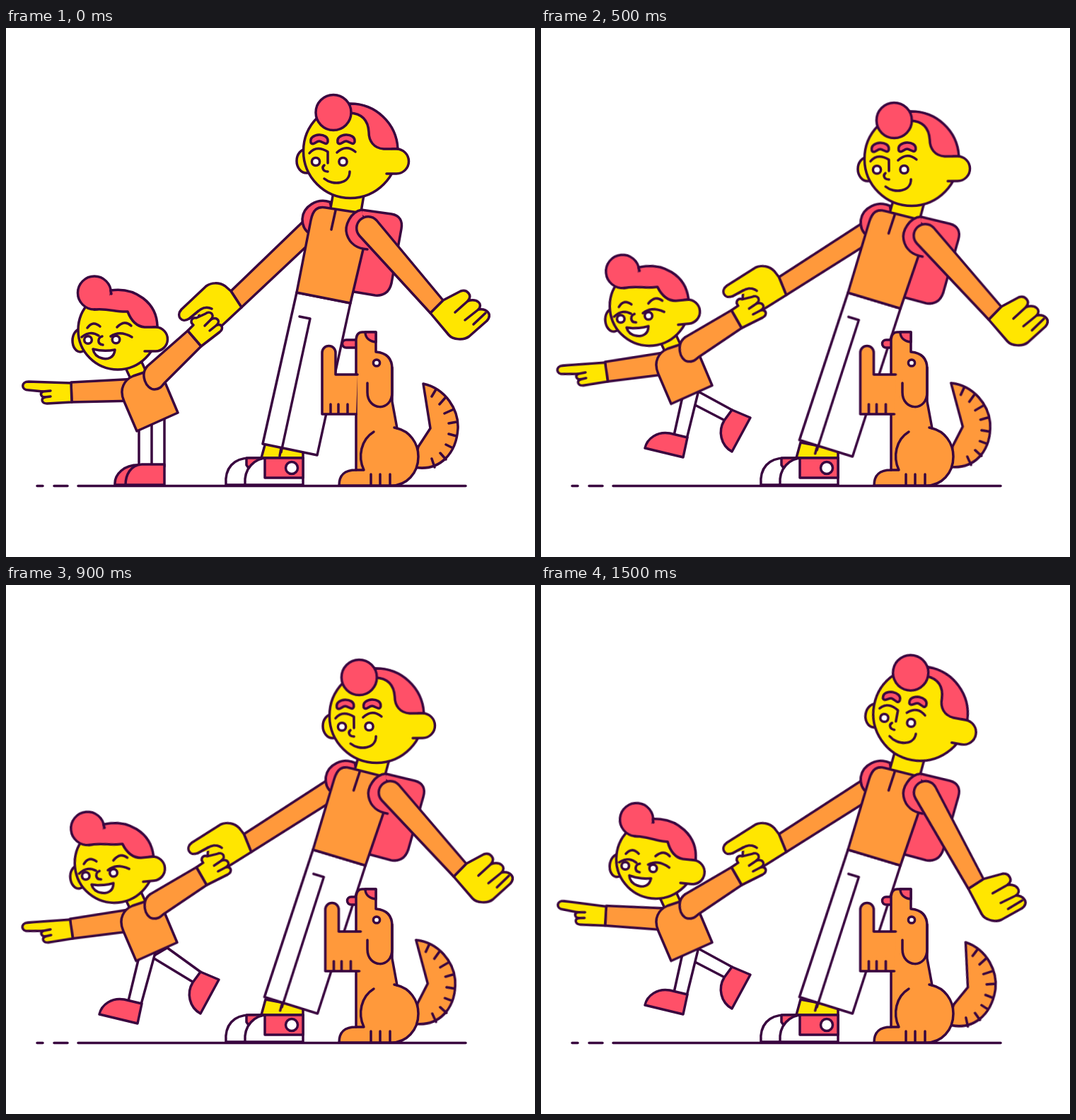
Animation of 748x748 px, one loop 1600 ms. Source, as an HTML page:

```html
<!DOCTYPE html>
<html lang="en">
<head>
<meta charset="utf-8">
<title>Walk with the dog</title>
<style>
html, body { margin: 0; width: 100%; height: 100%; overflow: hidden; background: #fff; }
svg { display: block; width: 100vw; height: 100vh; }
.ink { fill: none; stroke: #39063f; stroke-width: 3.5; stroke-linecap: round; stroke-linejoin: round; }
.o { fill: #ff993b; }
.y { fill: #ffe600; }
.r { fill: #ff5068; }
.w { fill: #fff; }
.bare { stroke: none; }

/* hop: 200 ms, sway: 400 ms, legs and blink: 800 ms */
.hop { animation: 200ms step-end infinite; }
.sway { animation: 400ms step-end infinite; }
.swap { animation: 800ms step-end infinite; }

#dad { animation-name: lean; transform-origin: 440px 604px; }
@keyframes lean { 50% { transform: translate(.5px, 2px) rotate(5.6deg); } 0%, 100% { transform: none; } }
#dadArm { animation-name: swing; transform-origin: 512px 284px; }
@keyframes swing {
  0%, 50%, 100% { transform: none; }
  25% { transform: rotate(-6.4deg); }
  75% { transform: rotate(6.6deg); }
}
#dadHead { animation-name: nod; transform-origin: 482px 245px; }
@keyframes nod {
  0%, 50%, 100% { transform: none; }
  25% { transform: translate(37.5px, 11px) rotate(-.5deg); }
  75% { transform: translate(36.5px, 6px) rotate(10.5deg); }
}
#dadPull { animation-name: pull; transform-origin: 326px 384px; }
@keyframes pull { 0%, 100% { transform: none; } 50% { transform: translate(16px, -18.5px) rotate(11deg); } }
#kidPull { animation-name: tug; transform-origin: 326px 384px; }
@keyframes tug { 0%, 100% { transform: none; } 50% { transform: translate(19.5px, -15px) rotate(11deg); } }
#kid { animation-name: lift; }
@keyframes lift { 0%, 100% { transform: none; } 50% { transform: translate(-1px, -38.5px); } }
#point { animation-name: point; transform-origin: 185px 510px; }
@keyframes point {
  0%, 50%, 100% { transform: none; }
  25% { transform: rotate(-5.9deg); }
  75% { transform: rotate(5.5deg); }
}
#kidHead { animation-name: wobble; transform-origin: 180px 478px; }
@keyframes wobble {
  0%, 50%, 100% { transform: none; }
  25% { transform: translate(0, -36px) rotate(-5.5deg); }
  75% { transform: translate(-1px, -37.5px) rotate(6deg); }
}
#stand { animation-name: stand; }
@keyframes stand { 0%, 100% { visibility: visible; } 50% { visibility: hidden; } }
#kick { animation-name: kick; }
@keyframes kick { 0%, 25%, 50%, 100% { visibility: hidden; } 12.5%, 37.5% { visibility: visible; } }
#tuck { animation-name: tuck; }
@keyframes tuck { 0%, 75%, 100% { visibility: hidden; } 62.5%, 87.5% { visibility: visible; } }
#open { animation-name: open; }
@keyframes open { 0%, 50%, 100% { visibility: visible; } 37.5% { visibility: hidden; } }
#shut { animation-name: shut; }
@keyframes shut { 0%, 50%, 100% { visibility: hidden; } 37.5% { visibility: visible; } }
#tail { animation-name: wag; transform-origin: 575px 600px; }
@keyframes wag {
  0%, 50%, 100% { transform: none; }
  25% { transform: rotate(-6deg); }
  75% { transform: rotate(6.2deg); }
}
#paw { animation-name: paw; }
@keyframes paw { 0%, 100% { transform: none; } 50% { transform: translateX(4.5px); } }
#tongue { animation-name: lick; }
@keyframes lick { 0%, 100% { transform: none; } 50% { transform: translateX(7px); } }
</style>
</head>
<body>
<svg viewBox="0 0 748 748" class="ink">
  <path d="M44 647.5H52M68 647.5H87M102 647.5H650"/>

  <!-- father -->
  <path class="y" d="M367 586L361 608H420V596Z"/>
  <g id="dadPull" class="hop">
    <path class="o" d="M318 372L428 266L432 302L333 395Z"/>
    <path class="y" d="M318 372L310 365C301 359 290 360 283 365L248 398C240 407 248 418 259 411L272 400L275 425L303 423L333 395Z"/>
    <path class="y" d="M259 411L275 398Q283 393 291 397"/>
  </g>
  <g id="dad" class="hop">
    <path class="r" d="M458 246C440 240 420 252 419 270C419 280 423 287 430 291L470 290Z"/>
    <path class="r" d="M490 256L502 257L545 263C557 265 561 273 559 284L545 361C542 374 533 379 522 378L480 371Z"/>
    <path class="w" d="M411 374L487 389L440 604L363 588Z"/>
    <path d="M415 408L430 411L389 600M389 594L387 605"/>
    <path class="y" d="M463 232L506 236L501 266L458 260Z"/>
    <path class="o" d="M411 374L431 272C434 257 440 252 452 254L498 261L514 275L487 389Z"/>
    <path d="M466 258L460 285"/>
    <path class="r" d="M503 257C487 260 478 280 482 292C486 305 497 312 511 313"/>
    <g id="dadArm" class="sway">
      <path class="y" d="M600 403L618 385L643 372C652 369 660 378 653 386C666 382 675 390 668 398C680 396 688 405 680 414L655 436C647 442 632 441 626 434Z"/>
      <path d="M653 386L635 402M668 398L649 413M678 403L661 419"/>
      <path class="o" d="M600 403L500 294A16 16 0 0 1 524 272L618 385Z"/>
    </g>
  </g>
  <g id="dadHead" class="sway">
    <ellipse class="y" cx="425" cy="188" rx="14" ry="17"/>
    <circle class="y" cx="487" cy="174" r="66.5"/>
    <path class="r" d="M486 107A67 67 0 0 1 554 171H534C520 170 513 160 513 147C512 131 504 121 486 120Z"/>
    <circle class="r" cx="463" cy="119.5" r="25"/>
    <path class="y" d="M546 171H552A17.5 17.5 0 0 1 552 206H538"/>
    <path class="r" d="M431 162C428 148 457 147 455 161C453 167 447 160 443 160C438 160 434 167 431 162ZM469 162C466 148 495 147 493 161C491 167 485 160 481 160C476 160 472 167 469 162Z"/>
    <path d="M429 177Q439 165 455 175V191M450 194C446 197 448 203 455 203M468 176Q481 164 494 175M450 213C462 223 486 221 486 203"/>
    <circle class="w" cx="438" cy="189" r="5.6"/>
    <circle class="w" cx="476.5" cy="189" r="5.6"/>
  </g>
  <path class="w" d="M311 646C309 622 322 608 345 608H370V646Z"/>
  <path class="r" d="M340 608H368L345 625L340 618Z"/>
  <path class="w" d="M338 646C336 622 352 608 370 608H420V646Z"/>
  <path class="r" d="M366 608H420V636H366Z"/>
  <circle class="w" cx="404" cy="622" r="8.5"/>

  <!-- child -->
  <g id="stand" class="hop">
    <path class="w" d="M188 550H224V620H188ZM206 550V620"/>
    <path class="r" d="M192 618C166 616 153 632 154 646H190Z"/>
    <path class="r" d="M224 617H192C176 618 169 632 169 646H224Z"/>
  </g>
  <g id="kick" class="swap">
    <path class="w" d="M228 513L275 547L267 563L206 526Z"/>
    <path class="r" d="M275 547L301 558L275 606C259 597 255 577 264 562Z"/>
    <path class="w" d="M190 518L173 588L191 593L211 520Z"/>
    <path class="r" d="M192 592L186 620L132 607C135 593 150 583 167 586Z"/>
  </g>
  <g id="tuck" class="swap">
    <path class="w" d="M215 510L270 540L262 556L210 529Z"/>
    <path class="r" d="M270 540L296 551L270 599C254 590 250 570 259 555Z"/>
    <path class="w" d="M203 508L188 576L206 581L224 508Z"/>
    <path class="r" d="M207 579L201 607L147 594C150 580 165 570 182 573Z"/>
  </g>
  <g id="kid" class="hop">
    <g id="point" class="sway">
      <path class="o" d="M185 496L92 501L93 529L185 527Z"/>
      <path class="y" d="M92 502L32 500C21 500 21 512 32 512L52 514C47 517 50 522 55 522C48 524 51 531 58 531L93 529Z"/>
      <path d="M52 514L63 513M55 522L63 521"/>
    </g>
    <path class="y" d="M166 474L188 464L201 492L178 500Z"/>
    <path class="o" d="M185 570L167 528C159 510 168 497 180 492L216 480L243 544Z"/>
  </g>
  <g id="kidPull" class="hop">
    <path class="o" d="M257 428L200 478C189 490 198 511 210 511C217 511 220 507 224 502L276 450Z"/>
    <path class="y" d="M257 428L265 420C259 415 263 409 269 410L282 404C288 399 296 405 290 412C298 408 304 414 298 420C306 418 308 425 302 430L276 450Z"/>
    <path d="M290 412L281 421M298 420L288 428"/>
  </g>
  <g id="kidHead" class="sway">
    <ellipse class="y" cx="105" cy="442" rx="11" ry="16"/>
    <circle class="y" cx="158" cy="427" r="56"/>
    <circle class="r" cx="125" cy="374.5" r="23.5"/>
    <path class="r" d="M149 376L148 371C182 366 214 388 214 423H196C184 422 177 414 172 401C155 402 145 396 125 398"/>
    <path class="y" d="M208 423H212A17 17 0 0 1 211 457H196"/>
    <path d="M115 424Q123 413 133 422M157 423Q168 412 177 421M136 436C130 437 128 447 137 448"/>
    <path class="w" d="M123 454Q138 458 154 455C153 467 143 469 136 467C128 465 124 460 123 454Z"/>
    <g id="open" class="swap">
      <path d="M107 437Q119 427 131 435M148 436Q161 427 178 437"/>
      <circle class="w" cx="116" cy="441" r="5.3"/>
      <circle class="w" cx="155.5" cy="440.5" r="5.3"/>
    </g>
    <path id="shut" class="swap" d="M116 436L126 440L116 445M171 434L160 439L171 444"/>
  </g>

  <!-- dog -->
  <path id="tail" class="o sway" d="M576 620L583 592L600 566L590 503C622 510 640 540 639 566C637 600 615 628 576 621M608 511L602 521M621 523L613 532M631 540L620 545M637 557L626 559M637 577L626 574M632 594L622 589M622 610L614 601M606 621L602 609"/>
  <path id="tongue" class="r hop" d="M505 441H481A5.5 5.5 0 0 0 481 452H505Z"/>
  <path class="o" d="M495 440Q496 430 504 430H523V458Q546 460 546 482V528L553 566C570 570 583 586 583 606C583 630 566 647 545 647H471C471 632 478 625 495 625Z"/>
  <path class="o bare" d="M490 627H510V645H490Z"/>
  <path class="r" d="M508 430H523V444C514 443 508 438 508 430Z"/>
  <path d="M546 480V515C546 543 511 542 511 515V502M553 566L549 565M520 571C502 582 497 606 506 625H495M516 631V646M529 631V646M543 631V646"/>
  <circle class="w" cx="524" cy="473.5" r="4.6"/>
  <g id="paw" class="hop">
    <path class="o" d="M497 490H466V459A9.5 9.5 0 0 0 447 459V546H495"/>
    <path d="M459 532V545M470 532V545M483 532V545"/>
  </g>
</svg>
</body>
</html>
```
